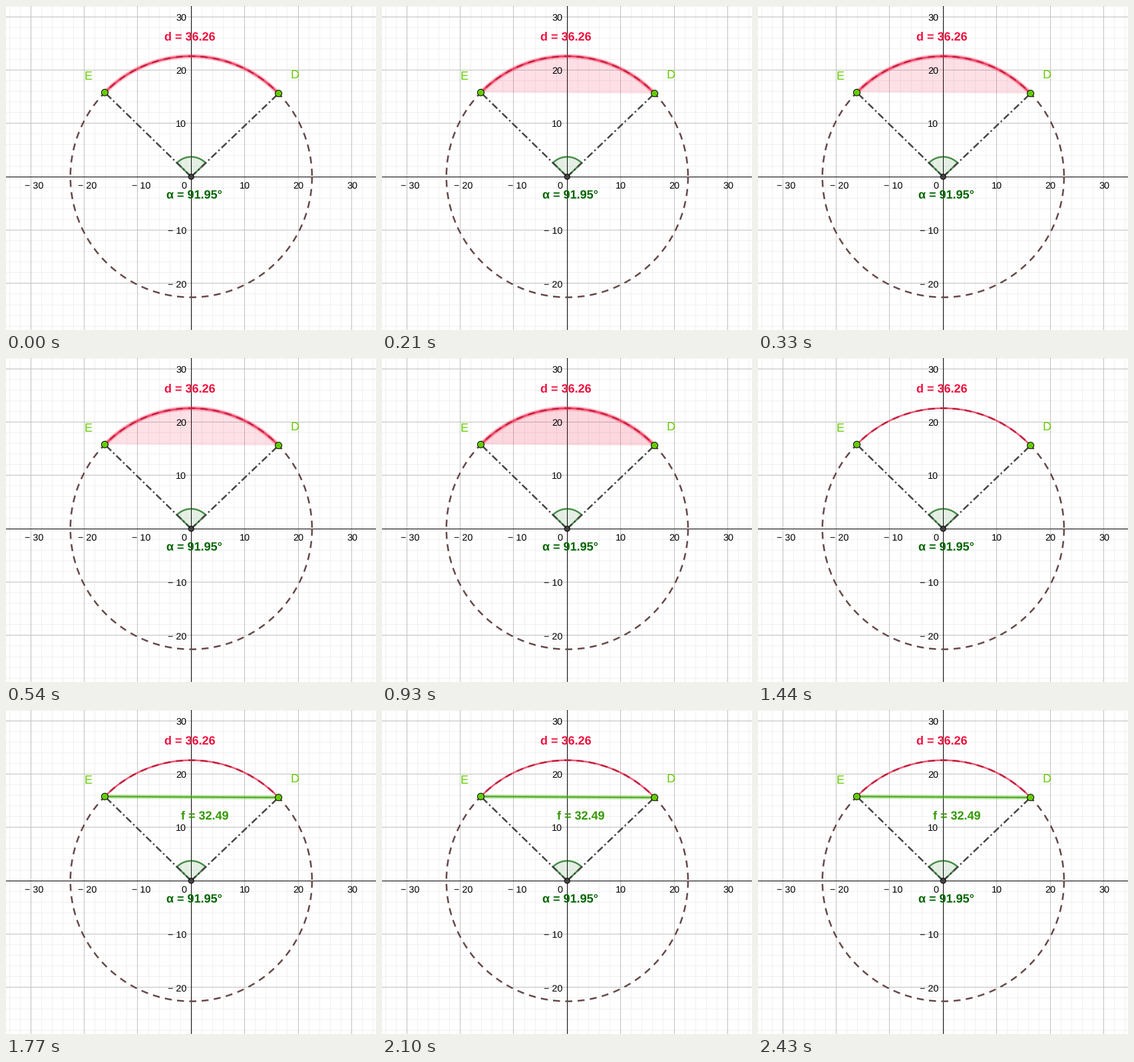
A matplotlib script that plays this animation: 556 px wide and 488 px high, repeating every 2700 ms.

```python
import numpy as np
import matplotlib.pyplot as plt
from matplotlib.animation import FuncAnimation
from matplotlib.patches import Circle, Polygon

W, H, DPI = 556, 488, 64
PT = 72 / DPI                      # points per pixel
STEP, LOOP = 30, 2700              # ms
CX, CY, UNIT = 278.3, 257.2, 8.035
R = 22.594 * UNIT
ANGLE_D, ANGLE_E = 43.7, 135.65

RED, GREEN, DARK_GREEN, LIME = "#f00f3c", "#339900", "#006400", "#66cc00"
DASHED = (10.5, 8)
DASH_DOT = (10.5, 4, 2.5, 4)

# (start in ms, opacity) of the segment under the arc
FILL = [(0, 0), (150, .10), (210, .13), (330, .125), (540, .12),
        (720, .125), (900, .14), (930, .165), (1080, 0)]
HALO_END = 1440
CHORD = [(1770, 1920), (2100, 2280), (2430, LOOP)]

plt.rcParams["font.family"] = "Liberation Sans"
plt.rcParams["text.hinting"] = "none"
fig = plt.figure(figsize=(W / DPI, H / DPI), dpi=DPI, facecolor="white")
ax = fig.add_axes([0, 0, 1, 1])
ax.set(xlim=(0, W), ylim=(H, 0))
ax.axis("off")


def polar(deg, radius=R):
    a = np.radians(deg)
    return CX + radius * np.cos(a), CY - radius * np.sin(a)


def line(x, y, color, width, z, dash=None, **kw):
    style = (0, [d / width for d in dash]) if dash else "-"
    return ax.plot(x, y, color=color, lw=width * PT, ls=style, zorder=z,
                   solid_capstyle="butt", dash_capstyle="butt",
                   snap=False, **kw)[0]


def label(x, y, text, size, color="black", ha="left", weight="normal"):
    return ax.text(x, y, text, fontsize=size * PT, color=color, ha=ha,
                   va="baseline", weight=weight, zorder=9)


def dot(x, y, radius, color):
    ax.add_patch(Circle((x, y), radius, fc=color, ec="black", lw=PT, zorder=8))


def rules(offset, color, z):
    """A vertical and a horizontal grid line, each filling one pixel row."""
    x, y = np.floor(CX + offset) + .5, np.floor(CY + offset) + .5
    line([x, x], [0, H], color, 1, z)
    line([0, W], [y, y], color, 1, z)


def tick(value):
    return f"\u2212 {-value}" if value < 0 else str(value)


def draw_grid():
    for k in range(-18, 19):
        color, z = ("#c0c0c0", 1) if k % 5 == 0 else ("#f0f0f0", 0)
        rules(2 * k * UNIT, color, z)
    rules(0, "black", 2)
    for v in (-30, -20, -10, 10, 20, 30):
        shift = 5 if v < 0 else .7
        label(CX + v * UNIT + shift, 275, tick(v), 14.4, ha="center")
        if v > -30:
            label(271.3, CY - v * UNIT + 5.5, tick(v), 14.4, ha="right")
    label(271.3, 275, "0", 14.4, ha="right")


draw_grid()

d, e = polar(ANGLE_D), polar(ANGLE_E)
sweep = np.linspace(ANGLE_D, ANGLE_E, 200)
arc = polar(sweep)

# angle sector
sector = np.vstack([(CX, CY), np.column_stack(polar(sweep, 30))])
ax.add_patch(Polygon(sector, fc=DARK_GREEN, alpha=.1, lw=0, zorder=3))
ax.add_patch(Polygon(sector, fill=False, ec=DARK_GREEN, alpha=.7,
                     lw=2.5 * PT, zorder=3))

# circle, dashed clockwise from the right, and radii
line(*polar(np.linspace(0, -360, 721)), "#664848", 2.5, 4, DASHED)
for p in (d, e):
    line([CX, p[0]], [CY, p[1]], "#444444", 2.5, 4, DASH_DOT)

# arc with its highlight and segment
fill = ax.add_patch(Polygon(np.column_stack(arc), fc=RED, lw=0, zorder=3))
halo = line(*arc, RED, 6.5, 5, alpha=.3)
line(*arc, RED, 2.5, 6, alpha=.7)

# chord with its highlight and length
ends = [d[0], e[0]], [d[1], e[1]]
chord = [line(*ends, "#66cc33", 6.5, 5, alpha=.35),
         line(*ends, GREEN, 2.5, 6, alpha=.75),
         label(263, 165, "f = 32.49", 18, GREEN, weight="bold")]

dot(*d, 5, LIME)
dot(*e, 5, LIME)
dot(CX, CY, 4, "#444444")
label(117.7, 111, "E", 18, LIME)
label(428, 109, "D", 18, LIME)
label(238, 52, "d = 36.26", 18, RED, weight="bold")
label(241, 290, "α = 91.95°", 18, DARK_GREEN, weight="bold")


def update(n):
    t = n * STEP
    fill.set_alpha([a for start, a in FILL if start <= t][-1])
    halo.set_visible(t < HALO_END)
    shown = any(a <= t < b for a, b in CHORD)
    for part in chord:
        part.set_visible(shown)
    return [fill, halo, *chord]


anim = FuncAnimation(fig, update, frames=LOOP // STEP, interval=STEP,
                     repeat=True, repeat_delay=0, blit=False)
plt.show()
```
